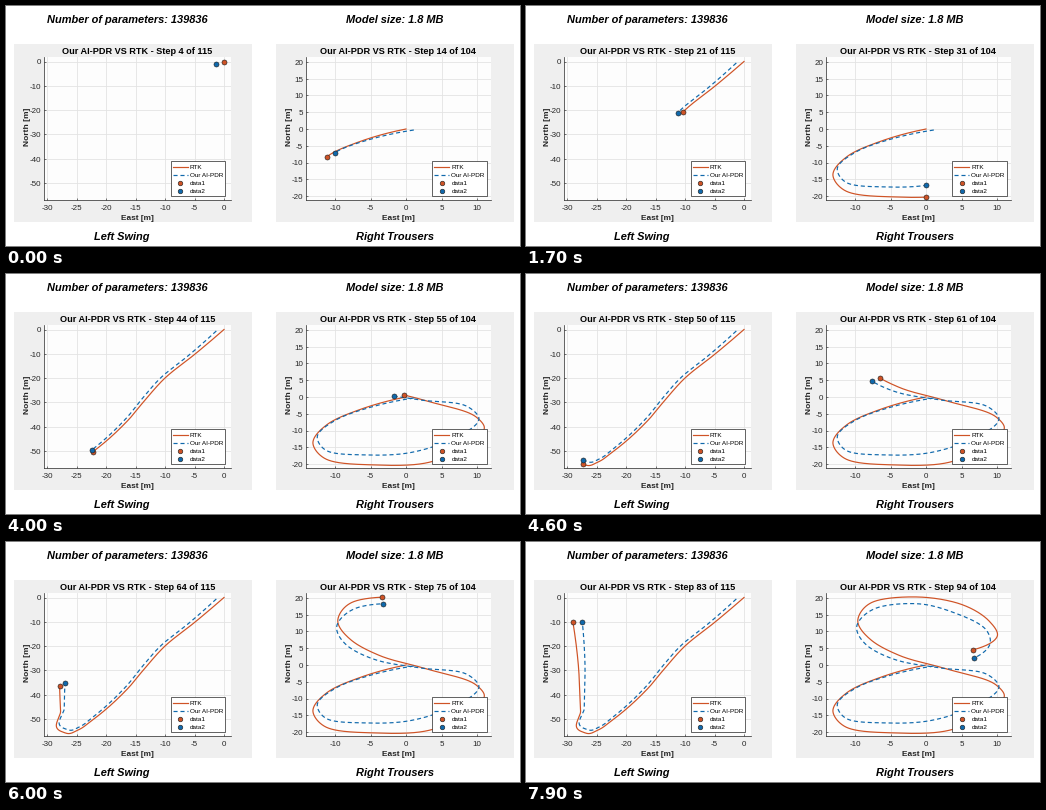
Write a matplotlib script that moves like this. It is 514 by 240 pixels and loops after 8 s.

```python
import matplotlib.pyplot as plt
import numpy as np
from matplotlib.animation import FuncAnimation
from matplotlib.lines import Line2D
from matplotlib.patches import Rectangle

W, H, DPI = 514, 240, 64
PT = 72 / DPI  # points per pixel
FRAMES, INTERVAL = 80, 100
ORANGE, BLUE = "#CF5326", "#1069AC"
INK, GRID, PANEL = "#262626", "#E2E2E2", "#EFEFEF"

plt.rcParams["font.family"] = "Liberation Sans"

# Key points of the walks, in metres east and north.
SWING = [(0, 0), (-4.7, -9.7), (-10.1, -20.2), (-13.1, -28.2), (-16.4, -37.7),
         (-22.5, -50.8), (-24.7, -54.5), (-26.4, -56), (-27.5, -55.2),
         (-27.7, -46.7), (-28.1, -27.2), (-29, -10.1)]
EIGHT = [(0, 0), (-6.3, -3.6), (-11.1, -8.2), (-13.1, -14), (-11.3, -18.5),
         (-4.2, -20.3), (2.8, -19.7), (8.5, -14.6), (11, -8.7), (9.9, -6),
         (3.5, -1.5), (-3.8, 2.9), (-7.7, 7.4), (-9.6, 13.5), (-7.6, 18.7),
         (-1.1, 20.3), (4.4, 18.5), (8.9, 13.1), (10, 8.4), (6.6, 4.5)]
EIGHT_PDR = [(1.1, -0.3), (-4.9, -3), (-9.9, -6.9), (-12.5, -11.9), (-11.1, -16.1),
             (-5.6, -17.3), (-0.3, -16.9), (5.6, -13.4), (10.2, -5.8), (8.5, -2.7),
             (2.1, -0.9), (-4.2, 1.5), (-8.4, 6), (-9.7, 12), (-7, 17),
             (-0.7, 18.2), (4.1, 15.5), (8.5, 10.4), (8.9, 5.7), (6.8, 2.1)]


def smooth(points, n=1200):
    """Cubic curve through the points, spaced by chord length."""
    p = np.array(points, float)
    t = np.r_[0, np.cumsum(np.hypot(*np.diff(p, axis=0).T))]
    v = np.gradient(p, t, axis=0, edge_order=2)
    s = np.linspace(0, t[-1], n)
    i = np.clip(np.searchsorted(t, s, side="right") - 1, 0, len(t) - 2)
    h = (t[i + 1] - t[i])[:, None]
    u = (s - t[i])[:, None] / h
    d, a, b = p[i + 1] - p[i], v[i] * h, v[i + 1] * h
    return p[i] + u * a + u**2 * (3 * d - 2 * a - b) + u**3 * (a + b - 2 * d)


def drift(path):
    """Dead-reckoning error that slides east and bulges north half way."""
    s = np.linspace(0, 1, len(path))
    east = 2.9 * s - 1.3
    north = 1.7 * np.sin(np.pi * s) ** 2 - 0.6 * (1 - s)
    return path + np.c_[east, north]


class Walk:
    """A path walked at constant speed between two steps."""

    def __init__(self, path, first, last):
        self.path, self.first, self.last = path, first, last
        self.dist = np.r_[0, np.cumsum(np.hypot(*np.diff(path, axis=0).T))]

    def until(self, step):
        share = np.clip((step - self.first) / (self.last - self.first), 0, 1)
        done = share * self.dist[-1]
        head = [np.interp(done, self.dist, c) for c in self.path.T]
        return np.vstack([self.path[self.dist < done], head]).T


fig = plt.figure(figsize=(W / DPI, H / DPI), dpi=DPI, facecolor="white")


def pixel_layer(z):
    ax = fig.add_axes([0, 0, 1, 1], zorder=z)
    ax.set(xlim=(0, W), ylim=(H, 0))
    ax.axis("off")
    return ax


stage, overlay = pixel_layer(0), pixel_layer(5)


def label(x, y, s, px, color=INK, ha="center", va="baseline", **kw):
    return overlay.text(x, y, s, fontsize=px * PT, color=color, ha=ha, va=va, **kw)


def stroke(color, dashed=False):
    return dict(color=color, lw=1.2 * PT, dash_capstyle="butt",
                ls=(0, (3.4, 2.4)) if dashed else "-")


def dot(color, px=5):
    return dict(marker="o", ls="", ms=px * PT, mfc=color, mec="#222222", mew=0.6 * PT)


def draw_legend(x, y):
    overlay.add_patch(Rectangle((x, y), 54.5, 35, fc="white", ec=INK, lw=0.7 * PT))
    rows = [("RTK", stroke(ORANGE)), ("Our AI-PDR", stroke(BLUE, True)),
            ("data1", dot(ORANGE, 4.6)), ("data2", dot(BLUE, 4.6))]
    for k, (name, style) in enumerate(rows):
        cy = y + 5.4 + 8.1 * k
        xs = [x + 9.5] if "marker" in style else [x + 2, x + 17]
        overlay.add_line(Line2D(xs, [cy] * len(xs), **style))
        label(x + 19, cy + 2.3, name, 6.4, "black", ha="left")


class Panel:
    def __init__(self, left, box, origin, scale, xticks, yticks, walks, total):
        x0, x1, y0, y1 = box
        (ox, oy), (sx, sy) = origin, scale
        self.walks, self.total = walks, total
        stage.add_patch(Rectangle((left, 38), 238, 178, fc=PANEL, lw=0))

        ax = fig.add_axes([x0 / W, 1 - y1 / H, (x1 - x0) / W, (y1 - y0) / H], fc="#FDFDFD")
        ax.set(xlim=((x0 - ox) / sx, (x1 - ox) / sx),
               ylim=((oy - y1) / sy, (oy - y0) / sy), xticks=xticks, yticks=yticks)
        ax.grid(color=GRID, lw=0.8 * PT)
        ax.set_axisbelow(True)
        ax.tick_params(direction="in", length=2 * PT, width=0.6 * PT, color=INK,
                       labelbottom=False, labelleft=False)
        ax.spines[["top", "right"]].set_visible(False)
        for side in ("left", "bottom"):
            ax.spines[side].set(color=INK, linewidth=0.7 * PT)

        for v in xticks:
            label(ox + sx * v, 204, str(v), 8)
        for v in yticks:
            label(x0 - 2.5, oy - sy * v + 2.9, str(v), 8, ha="right")
        mid = (x0 + x1) / 2
        label(mid, 214, "East [m]", 8.2, weight="bold")
        label(left + 13.5, 121, "North [m]", 8.4, va="center", weight="bold", rotation=90)
        self.title = label(mid, 48, "", 9.12, "black", weight="bold")

        self.lines = [ax.plot([], [], **stroke(ORANGE))[0],
                      ax.plot([], [], **stroke(BLUE, True))[0]]
        self.dots = [ax.plot([], [], clip_on=False, **dot(c))[0] for c in (ORANGE, BLUE)]
        draw_legend(x0 + 126.8, 155.4)

    def show(self, step):
        self.title.set_text(f"Our AI-PDR VS RTK - Step {step} of {self.total}")
        for walk, line, head in zip(self.walks, self.lines, self.dots):
            x, y = walk.until(step)
            line.set_data(x, y)
            head.set_data(x[-1:], y[-1:])


swing_path = smooth(SWING)
swing = Panel(8, (38, 225, 51, 194), (218, 55.5), (5.9, 2.43),
              range(-30, 1, 5), range(-50, 1, 10),
              [Walk(swing_path, 4.4, 83), Walk(drift(swing_path), 3.8, 83)], 115)
trousers = Panel(270, (299.5, 485, 51, 194), (400, 123), (7.1, 3.35),
                 range(-10, 11, 5), range(-20, 21, 5),
                 [Walk(smooth(EIGHT), 3.6, 94), Walk(smooth(EIGHT_PDR), 3.5, 94)], 104)

for x, y, s in [(121.2, 17.2, "Number of parameters: 139836"),
                (388.6, 17.2, "Model size: 1.8 MB"),
                (116, 233.7, "Left Swing"), (388.6, 233.7, "Right Trousers")]:
    label(x, y, s, 11, "black", weight="bold", style="italic")


def update(i):
    swing.show(4 + i)
    trousers.show(14 + round(i * 80 / 79))
    return []


anim = FuncAnimation(fig, update, frames=FRAMES, interval=INTERVAL,
                     init_func=lambda: [], repeat=True, repeat_delay=0, blit=False)
plt.show()
```
